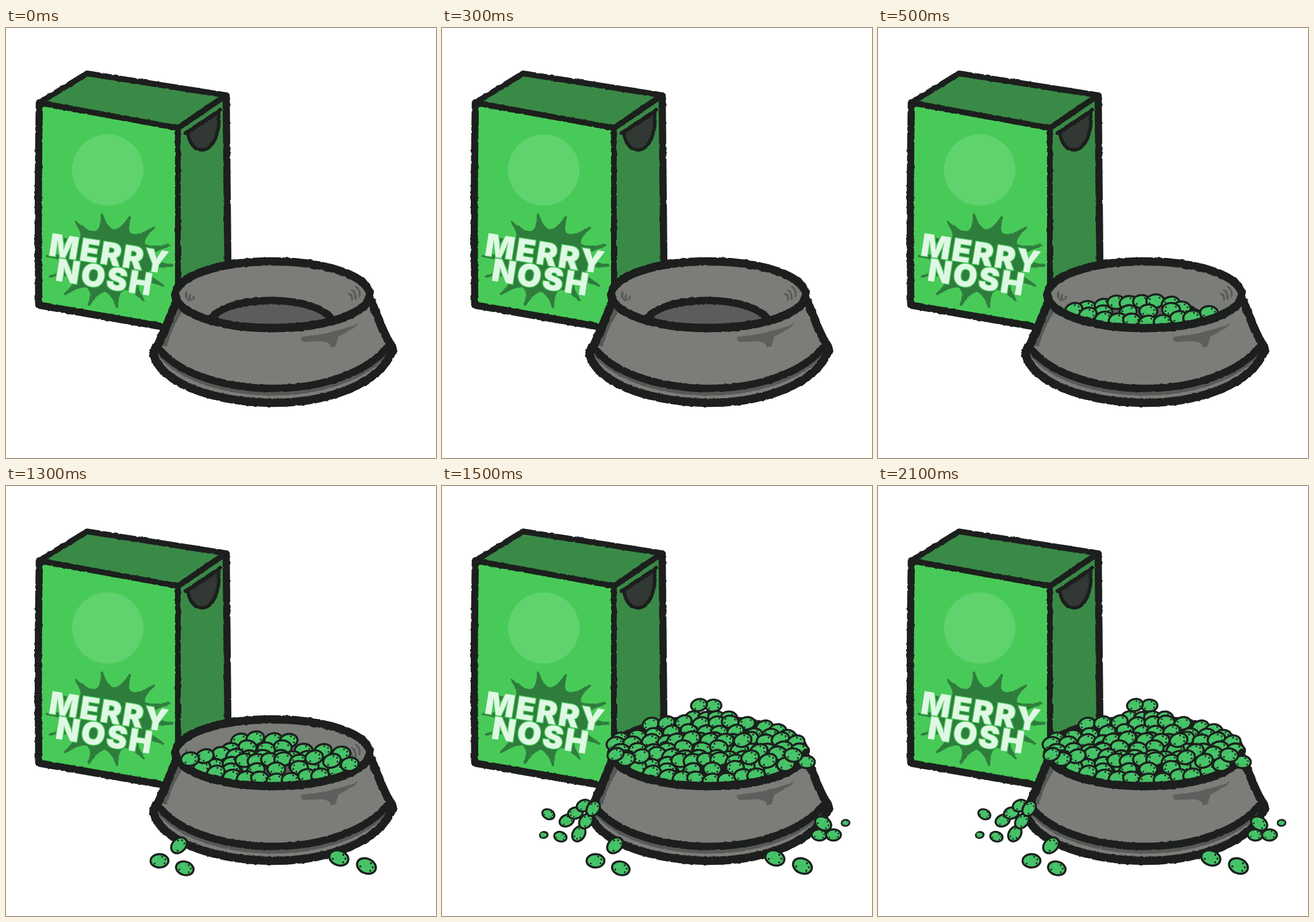
An HTML page for the animation above (2500 ms loop, 748 by 748 pixels).

```html
<!DOCTYPE html>
<html lang="en">
<head>
<meta charset="utf-8">
<title>Food bowl</title>
<style>
  html, body { margin: 0; width: 100%; height: 100%; overflow: hidden; background: #fff; }
  svg { display: block; width: 100vw; height: 100vh; }
  .ink { stroke: #1c1f1d; stroke-linecap: round; stroke-linejoin: round; }
  .line { fill: none; }
  .brand { font: 900 54px Inter, Roboto, sans-serif; letter-spacing: 3px; text-anchor: middle;
    fill: #dff8e4; stroke: #48ca58; stroke-width: 3px; paint-order: stroke; }
</style>
</head>
<body>
<svg viewBox="0 0 748 748">
  <defs>
    <filter id="rough" x="0" y="0" width="748" height="748" filterUnits="userSpaceOnUse" color-interpolation-filters="sRGB">
      <feTurbulence type="fractalNoise" baseFrequency=".13" numOctaves="2" seed="4"/>
      <feDisplacementMap in="SourceGraphic" scale="3" xChannelSelector="R" yChannelSelector="G"/>
    </filter>
    <clipPath id="mouth"><ellipse cx="463.5" cy="464" rx="169" ry="58"/></clipPath>
  </defs>

  <g filter="url(#rough)">
    <path fill="#3a8a47" d="M58 130L141 79L383 117L388 440L299 520Z"/>
    <path fill="#48ca58" d="M58 130L299 174V524L57 482Z"/>
    <path id="burst" fill="#2f7d3d" stroke="#2f7d3d" stroke-width="4" stroke-linejoin="round"/>
    <path class="ink" fill="#323833" stroke-width="6" d="M316 182C320 204 329 212 342 212C362 210 373 181 370 146Z"/>
    <path class="ink line" stroke-width="6" d="M312 183L373 142"/>
    <path class="ink line" stroke-width="10" d="M58 130L141 79L383 117L299 174ZM299 174V450"/>
    <path class="ink line" stroke-width="12.5" d="M58 130Q55 300 57 482L297 524M383 118L386 420"/>
  </g>
  <circle cx="177" cy="247" r="62" fill="#60d36f"/>
  <g class="brand">
    <text transform="translate(180 393) rotate(9)" y="19">MERRY</text>
    <text transform="translate(172 434) rotate(9)" y="19">NOSH</text>
  </g>

  <g filter="url(#rough)">
    <path id="body" fill="#7b7d79" d="M296 476C285 505 274 530 264 552Q256 558 257 570C275 625 380 652 463 652C560 652 650 620 673 560Q672 553 666 546C652 520 645 498 636 476Z"/>
    <path fill="#575957" d="M296 482L307 494Q291 515 280 554L264 552Z"/>
    <path fill="#5d5f5d" d="M514 537Q570 532 612 514Q615 518 578 537L573 554L566 555Q562 545 551 545L517 546Q511 541 514 537Z"/>
    <path class="line" stroke="#575957" stroke-width="7" d="M264 564C300 614 390 636 463 636C550 636 630 609 668 559"/>
    <path class="ink line" stroke-width="13" d="M264 555C300 605 390 627 463 627C550 627 630 600 668 550"/>
    <use href="#body" class="ink" fill-opacity="0" stroke-width="14.5"/>
    <ellipse cx="463.5" cy="464" rx="169" ry="58" fill="#7b7d79"/>
    <path class="line" stroke="#595b59" stroke-width="3.5" stroke-linecap="round" d="M314 459Q311 467 318 474M320 464Q318 469 322 473M326 467V472M597 463Q603 465 602 472M602 456Q609 461 608 471M609 450Q617 457 615 467"/>
    <ellipse class="ink" clip-path="url(#mouth)" cx="461" cy="516" rx="108" ry="42" fill="#5b5d5b" stroke-width="13"/>
    <ellipse class="ink line" cx="463.5" cy="464" rx="169" ry="58" stroke-width="14.5"/>
  </g>

  <g class="s3"><ellipse cx="463.5" cy="462" rx="166" ry="55" fill="#1c1f1d"/></g>
  <g id="back3" class="s3"></g>
  <g id="back2" class="s2"></g>
  <g id="base" class="s1"></g>
  <path class="ink line" filter="url(#rough)" stroke-width="14.5" d="M294.5 464A169 58 0 0 0 632.5 464"/>
  <g id="front2" class="s2"></g>
  <g id="front3" class="s3"></g>
</svg>
<script>
const $ = id => document.getElementById(id);
const TAU = Math.PI * 2;

let seed = 11;
const rnd = () => (seed = seed * 16807 % 2147483647) / 2147483647;
const spread = n => (rnd() * 2 - 1) * n;

// Burst: evenly turned tips joined by arcs that sag toward the centre.
function burst(n, cx, cy, rx, ry) {
  const at = (i, k) => {
    const a = i / n * TAU - 1.69;
    return `${cx + Math.cos(a) * rx * k} ${cy + Math.sin(a) * ry * k}`;
  };
  let d = `M${at(0, 1)}`;
  for (let i = 0; i < n; i++) d += `Q${at(i + .5, .34)} ${at(i + 1, 1)}`;
  return d + 'Z';
}
$('burst').setAttribute('d', burst(14, 180, 405, 110, 81));

function flecks(r, color) {
  let d = '';
  for (let i = 0; i < 7; i++) {
    const a = rnd() * TAU, k = Math.sqrt(rnd()) * .74 * r;
    d += `M${Math.cos(a) * k} ${Math.sin(a) * k * .75}l${spread(2)} ${spread(2)}`;
  }
  return `<path d="${d}" stroke="${color}" stroke-width="1.3"/>`;
}

function kibble(x, y, r, turn) {
  const side = rnd() < .75 ? 0 : Math.PI;
  const dots = [-1.1, -.3, .6, 2.5].map(a =>
    `<circle cx="${Math.cos(a + side) * r * .68}" cy="${Math.sin(a + side) * r * .5}" r="${r * .1}" fill="#1c1f1d"/>`);
  return `<g transform="translate(${x} ${y}) rotate(${turn})">
    <ellipse class="ink" rx="${r}" ry="${r * .75}" fill="#45c266" stroke-width="${2.4 + r * .08}"/>
    ${flecks(r, '#66d24a')}${flecks(r, '#52cbb8')}${flecks(r, '#36ad5a')}${dots.join('')}</g>`;
}

// A row of n kibbles from one point to another, bowed by sag; long rows are shaken a little.
function row(id, n, x0, y0, x1 = x0, y1 = y0, { sag = 0, r = 15.5, turn = -6 } = {}) {
  const shake = n > 3 ? 3 : 0;
  let out = '';
  for (let i = 0; i < n; i++) {
    const u = n > 1 ? i / (n - 1) : 0;
    out += kibble(x0 + (x1 - x0) * u + spread(shake),
      y0 + (y1 - y0) * u + sag * 4 * u * (1 - u) + spread(shake), r, turn + spread(16));
  }
  $(id).insertAdjacentHTML('beforeend', out);
}

// First helping
row('base', 8, 366, 487, 530, 487, { sag: -12 });
row('base', 4, 392, 492, 512, 492);
row('base', 10, 340, 490, 573, 496, { sag: 17 });

// Second helping
row('back2', 4, 406, 440, 493, 442);
row('back2', 7, 388, 456, 581, 464, { sag: -3 });
row('back2', 7, 372, 465, 525, 470, { sag: 6 });
row('back2', 6, 345, 486, 550, 486);
row('front2', 2, 346, 470, 320, 475);
row('front2', 3, 536, 472, 598, 484);

// Heap
row('back3', 2, 472, 382, 447, 381, { r: 14 });
row('back3', 4, 437, 401, 497, 400, { r: 14 });
row('back3', 9, 365, 417, 586, 424, { sag: -10, r: 14.5 });
row('back3', 11, 312, 439, 600, 438, { sag: -12, r: 14.5 });
row('back3', 12, 304, 447, 618, 445, { sag: -5 });
row('back3', 12, 310, 460, 620, 457);
row('back3', 12, 320, 474, 612, 476);
row('front3', 2, 302, 467, 634, 480, { r: 14.5 });
row('front3', 2, 523, 442, 611, 468);

// Spilled pieces
row('front2', 1, 301, 625, 301, 625, { turn: -60 });
row('front2', 2, 267, 652, 311, 665, { turn: 14 });
row('front2', 2, 579, 647, 627, 661, { r: 17, turn: 14 });
row('front3', 2, 185, 571, 206, 610, { r: 11, turn: 14 });
row('front3', 3, 217, 582, 247, 556, { r: 13, turn: -25 });
row('front3', 3, 238, 605, 263, 561, { r: 14, turn: -45 });
row('front3', 2, 656, 607, 681, 607, { r: 13 });
row('front3', 1, 663, 587, 663, 587, { r: 15, turn: 45 });
row('front3', 2, 177, 607, 702, 586, { r: 7 });

const LOOP = 2500;
const starts = { s1: 500, s2: 1000, s3: 1500 };
for (const [name, at] of Object.entries(starts)) {
  for (const el of document.querySelectorAll('.' + name)) {
    el.animate([
      { opacity: 0, offset: 0, easing: 'step-end' },
      { opacity: 1, offset: at / LOOP },
      { opacity: 1, offset: 1 }
    ], { duration: LOOP, iterations: Infinity });
  }
}
</script>
</body>
</html>
```
